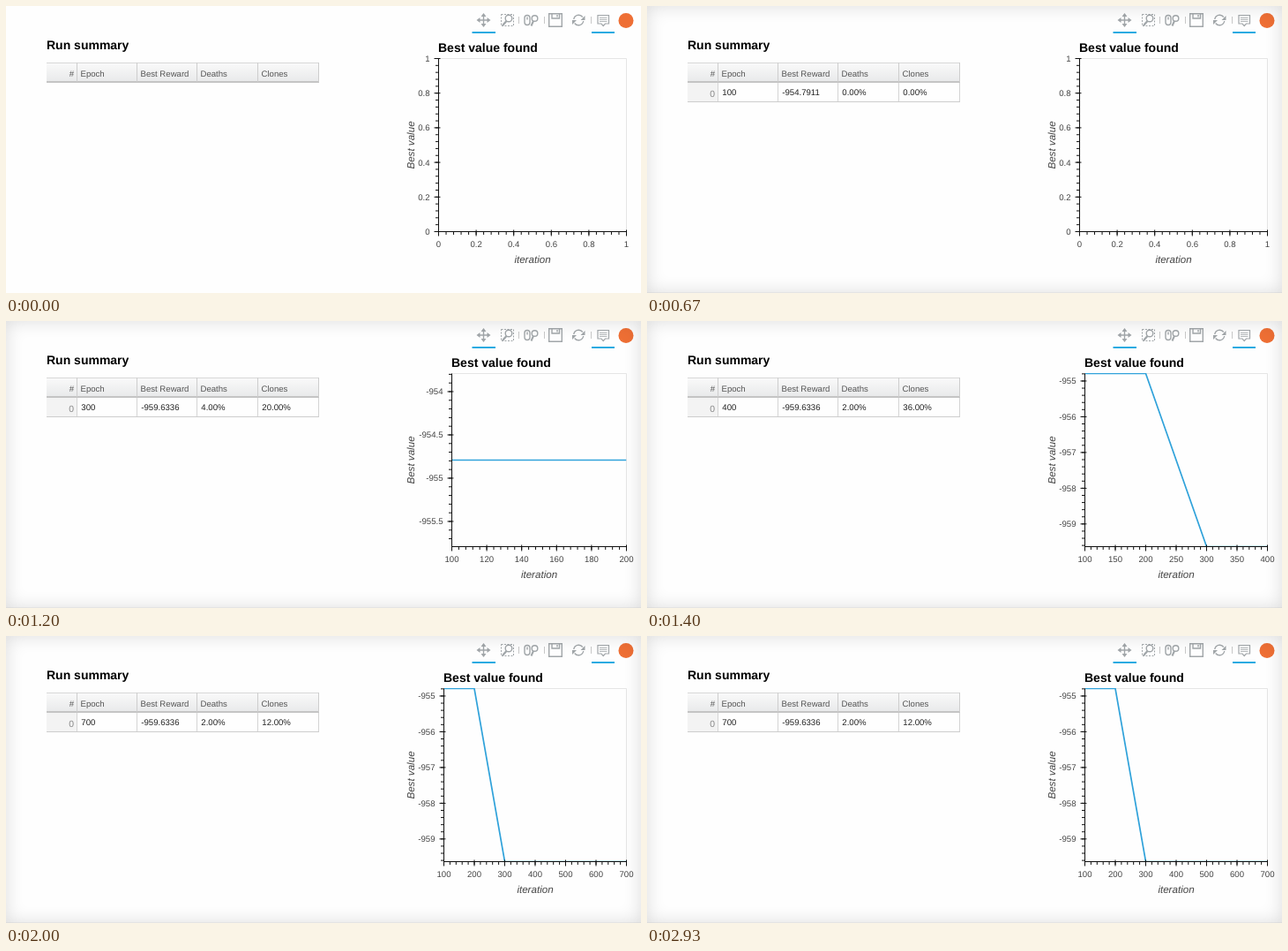
Write an HTML page that moves like this. It is 720x325 px and loops after 2990 ms.

```html
<!DOCTYPE html>
<html lang="en">
<head>
<meta charset="utf-8">
<title>Run summary</title>
<style>
  html, body { margin: 0; width: 100%; height: 100%; overflow: hidden; background: #fefefe; }
  svg { display: block; width: 100%; height: 100%; }
  #vignette {
    position: fixed; inset: 0;
    box-shadow: inset 0 0 20px rgba(0, 0, 0, .14), inset 0 -1px 1px rgba(0, 0, 0, .05);
  }
  text {
    font-family: "Liberation Sans", Arial, sans-serif; font-size: 9.6px; fill: #222;
    text-rendering: geometricPrecision;
  }
  .title { font-size: 14px; font-weight: bold; fill: #000; }
  .label { font-size: 11.6px; font-style: italic; fill: #444; text-anchor: middle; }
  .tick { fill: #444; }
  .head { fill: #555; }
  .mid { text-anchor: middle; }
  .end { text-anchor: end; }
</style>
</head>
<body>
<svg viewBox="0 0 720 325">
  <defs>
    <linearGradient id="headFill" x2="0" y2="1">
      <stop offset="0" stop-color="#fafafa"/>
      <stop offset="1" stop-color="#e8e9ea"/>
    </linearGradient>
  </defs>

  <g id="toolbar" fill="none" stroke="#a1a6a9" stroke-width="1.4">
    <path d="M535 16H548M541.5 9.5V22.5"/>
    <path fill="#a1a6a9" stroke="none" d="M541.5 8l3 4h-6zM541.5 24l3-4h-6zM533.5 16l4-3v6zM549.5 16l-4-3v6z"/>
    <path stroke-width="1" stroke-dasharray="2 1.5" d="M561.5 9.5H575.5V22.5H561.5Z"/>
    <circle cx="570" cy="14" r="3.8"/>
    <path stroke-width="2.2" d="M567.5 17l-4.5 5"/>
    <rect x="588" y="10.5" width="6" height="11" rx="3"/>
    <path d="M591 12.5v3"/>
    <circle cx="599.5" cy="14" r="3.3"/>
    <path stroke-width="2" d="M598 17l-2.5 5.5"/>
    <path d="M615.7 8.7H630.3V23.3H615.7ZM619 9V14H627.5V9M625 10v2.5"/>
    <path d="M643.8 15a5.6 5.6 0 0 1 10-2.5M654.7 17a5.6 5.6 0 0 1-10 2.5"/>
    <path fill="#a1a6a9" stroke="none" d="M656.5 11v5h-5zM642 21v-5h5z"/>
    <path stroke-width="1.2" d="M671 10.5H683.5V20H679.5L677.2 22.5L675 20H671Z"/>
    <path stroke-width=".8" d="M673 13.5h8.5M673 15.5h8.5M673 17.5h8.5"/>
    <path stroke="#c8c8c8" stroke-width="1" d="M581.5 12v8M610.5 12v8M663.5 12v8"/>
    <path stroke="#26aae1" stroke-width="2" d="M528.5 30H555M664 30H690"/>
    <circle cx="703" cy="16.5" r="8.5" fill="#ee6f35" stroke="none"/>
  </g>

  <text class="title" x="46" y="49">Run summary</text>
  <rect x="46" y="64" width="308.5" height="22" fill="url(#headFill)"/>
  <path d="M46 64.5H354.5" stroke="#d8d8d8"/>
  <path d="M46 86H355" stroke="#c4c4c4" stroke-width="2"/>
  <g id="header"></g>
  <g id="row"></g>
  <g id="plot"></g>
</svg>
<div id="vignette"></div>

<script>
const LOOP = 2990;
const TOP = 59.5, BOTTOM = 255.5, RIGHT = 703.5;
const COLUMNS = [80.5, 148.5, 216.5, 285.5, 354.5];
const FIRST = -954.7911, BEST = -959.6336;

// start time, epoch, best reward, deaths, clones
const ROWS = [
  [670, 100, FIRST, 0, 0],
  [1070, 200, FIRST, 2, 22],
  [1200, 300, BEST, 4, 20],
  [1330, 400, BEST, 2, 36],
  [1470, 500, BEST, 4, 24],
  [1530, 600, BEST, 2, 18],
  [1670, 700, BEST, 2, 12]
];

// start time, last plotted iteration
const PLOTS = [[0, 0], [1130, 200], [1270, 300], [1400, 400], [1470, 500], [1600, 600], [1670, 700]];

const byId = id => document.getElementById(id);
const text = (x, y, content, cls = "", extra = "") =>
  `<text x="${x}" y="${y}" class="${cls}" ${extra}>${content}</text>`;
const path = (d, color, width = 1, extra = "") =>
  `<path d="${d}" fill="none" stroke="${color}" stroke-width="${width}" ${extra}/>`;
const latest = (list, time) => list.filter(item => item[0] <= time).pop();

// The 1-2-5 step that gives closest to six intervals
function tickStep(span) {
  const power = 10 ** Math.floor(Math.log10(span / 6));
  const error = step => Math.abs(6 - span / step);
  return [1, 2, 5, 10].map(m => m * power)
    .reduce((best, step) => error(step) < error(best) - 1e-9 ? step : best);
}

function multiples(low, high, step) {
  const values = [];
  for (let i = Math.ceil(low / step - 1e-6); i <= high / step + 1e-6; i++) {
    values.push(+(i * step).toFixed(6));
  }
  return values;
}

function drawHeader() {
  const names = ["Epoch", "Best Reward", "Deaths", "Clones"];
  byId("header").innerHTML = text(77, 79.5, "#", "head end")
    + names.map((name, i) => text(COLUMNS[i] + 4, 79.5, name, "head")).join("")
    + COLUMNS.map(x => path(`M${x} 64V86`, "#cdcdcd")).join("");
}

function rowMarkup(row) {
  if (!row) return "";
  const [, epoch, reward, deaths, clones] = row;
  const cells = [epoch, reward, deaths.toFixed(2) + "%", clones.toFixed(2) + "%"];
  return `<rect x="46" y="87" width="34.5" height="21.5" fill="#f3f3f3"/>`
    + text(77, 103, 0, "end", 'style="fill:#888;font-size:10.4px"')
    + cells.map((cell, i) => text(COLUMNS[i] + 4.8, 101, cell)).join("")
    + COLUMNS.map(x => path(`M${x} 87V109`, "#d4d4d4")).join("")
    + path("M46 108.5H355", "#cdcdcd");
}

function plotMarkup(last) {
  const left = !last ? 490.5 : last === 200 ? 505.5 : 496.5;
  const [x0, x1] = last ? [100, last] : [0, 1];
  const [y0, y1] = !last ? [0, 1] : last === 200 ? [FIRST - 1, FIRST + 1] : [BEST, FIRST];
  const px = x => left + (x - x0) / (x1 - x0) * (RIGHT - left);
  const py = y => BOTTOM - (y - y0) / (y1 - y0) * (BOTTOM - TOP);
  const center = (left + RIGHT) / 2;
  const stepX = tickStep(x1 - x0), stepY = tickStep(y1 - y0);

  let out = text(left - .5, 52, "Best value found", "title")
    + path(`M${left} ${TOP}H${RIGHT}V${BOTTOM}`, "#e5e5e5");
  if (last) {
    const points = [[100, FIRST], [200, FIRST], [300, BEST], [700, BEST]]
      .map(([x, y]) => [Math.min(x, last), x > last && last < 300 ? FIRST : y]);
    out += `<clipPath id="frame"><rect x="${left}" y="${TOP - .5}" width="${RIGHT - left}" height="${BOTTOM - TOP + .5}"/></clipPath>`
      + path("M" + points.map(([x, y]) => `${px(x)} ${py(y)}`).join("L"), "#30a2da", 1.7, 'clip-path="url(#frame)"');
  }

  let ticks = `M${left} ${TOP}V${BOTTOM}H${RIGHT}`;
  for (const x of multiples(x0, x1, stepX / 5)) ticks += `M${px(x)} ${BOTTOM}v3.5`;
  for (const y of multiples(y0, y1, stepY / 5)) ticks += `M${left} ${py(y)}h-3.5`;
  for (const x of multiples(x0, x1, stepX)) {
    ticks += `M${px(x)} ${BOTTOM - 2}v7`;
    out += text(px(x), 273, x, "tick mid");
  }
  for (const y of multiples(y0, y1, stepY)) {
    ticks += `M${left + 2} ${py(y)}h-7`;
    out += text(left - 10, py(y) + 3.5, y, "tick end");
  }
  return out + path(ticks, "#111")
    + text(center, 290.5, "iteration", "label")
    + text(0, 0, "Best value", "label", `transform="translate(462.5 157.5) rotate(-90)"`);
}

let shown = "";
function render() {
  const time = performance.now() % LOOP;
  const row = latest(ROWS, time);
  const last = latest(PLOTS, time)[1];
  const shade = time < 70 ? 0 : time < 130 ? .5 : 1;
  const state = [row, last, shade].join();
  if (state !== shown) {
    shown = state;
    byId("row").innerHTML = rowMarkup(row);
    byId("plot").innerHTML = plotMarkup(last);
    byId("vignette").style.opacity = shade;
  }
  requestAnimationFrame(render);
}

drawHeader();
render();
</script>
</body>
</html>
```
